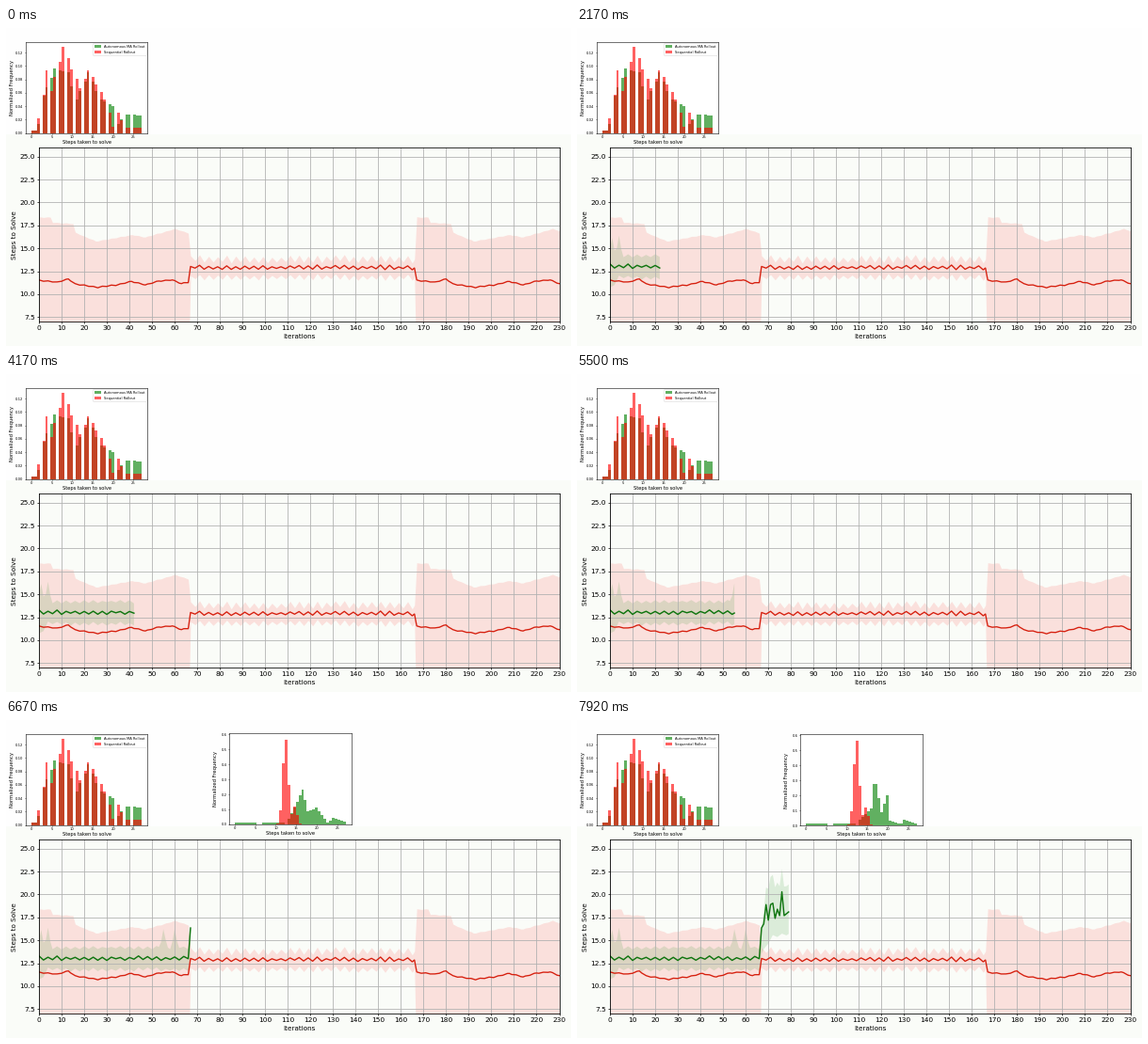
These frames come from a looping animation (600 px wide and 338 px high, 8000 ms). A matplotlib script:

```python
import math

import matplotlib.pyplot as plt
import numpy as np
from matplotlib.animation import FuncAnimation
from matplotlib.patches import Polygon, Rectangle
from matplotlib.transforms import Affine2D

W, H, DPI = 600, 338, 100
FRAMES, LOOP = 96, 8000
PT = 72 / DPI                      # points per pixel
RED, GREEN = "#d6200f", "#0f750f"
PAPER = "#fafcf8"
BINS = 40
BIN_W = 27 / BINS
JUMP, BACK, END = 67, 167, 230     # iterations where the behaviour switches

plt.rcParams["font.family"] = "DejaVu Sans"
rng = np.random.default_rng(4)

fig = plt.figure(figsize=(W / DPI, H / DPI), dpi=DPI, facecolor="#fefefe")
px = Affine2D().scale(1 / DPI) + fig.dpi_scale_trans
fig.add_artist(Rectangle((0, 0), W, H - 113, transform=px, fc=PAPER, lw=0, zorder=-5))


def px_axes(left, top, right, bottom, line, **kw):
    ax = fig.add_axes([left / W, 1 - bottom / H,
                       (right - left) / W, (bottom - top) / H], **kw)
    for spine in ax.spines.values():
        spine.set_linewidth(line * PT)
    return ax


def px_label(ax, x, y, text, size, rotation=0):
    ax.text(x, H - y, text, transform=px, fontsize=size * PT, rotation=rotation,
            ha="center", va="center", rotation_mode="anchor")


def curve(xs, *knots):
    return np.interp(xs, *np.array(knots).T)


def wobble(xs, amp, step=2):
    """Zigzag of random height around zero."""
    knots = np.arange(xs[0], xs[-1] + 2 * step, step)
    signs = np.where(np.arange(len(knots)) % 2, -1, 1)
    return np.interp(xs, knots, amp * signs * rng.uniform(0.2, 1, len(knots)))


def bell(xs, height, center, width):
    return height * np.exp(-0.5 * ((xs - center) / width) ** 2)


def integer_bins(*knots):
    """Heights for whole step counts, dropped into the finer bins."""
    steps = np.arange(28)
    heights = np.zeros(BINS)
    heights[np.minimum((steps / BIN_W).astype(int), BINS - 1)] = curve(steps, *knots)
    return heights


def histogram(box, ymax, yticks, fmt, green, red):
    left, top, right, bottom = box
    ax = px_axes(*box, line=0.55, facecolor="white")
    edges = np.arange(BINS) * BIN_W
    for heights, color, name in ((green, "green", "Autonomous MA Rollout"),
                                 (red, "red", "Sequential Rollout")):
        ax.bar(edges, heights, BIN_W, align="edge", color=color, alpha=0.62,
               linewidth=0, label=name)
    ax.set(xlim=(-1.35, 28.35), ylim=(0, ymax))
    ax.set_xticks(range(0, 26, 5))
    ax.set_yticks(yticks, [fmt % v for v in yticks])
    ax.tick_params(labelsize=3.7 * PT, length=1.2 * PT, width=0.5 * PT, pad=1.2 * PT)
    px_label(ax, (left + right) / 2, bottom + 9.6, "Steps taken to solve", 5.1)
    px_label(ax, left - 14.5, (top + bottom) / 2 + 0.5, "Normalized Frequency", 5.2, 90)
    return ax


# Histograms
hist = histogram(
    (21, 15, 150, 111.7), 0.1355, np.arange(0, .13, .02), "%.2f",
    integer_bins((1, .004), (2, .013), (3, .055), (6, .096), (9, .09), (11, .05),
                 (14, .09), (17, .05), (20, .04), (21, .013), (23, .028), (27, .026)),
    integer_bins((1, .004), (2, .022), (4, .093), (5, .062), (8, .129), (10, .095),
                 (12, .067), (14, .094), (18, .05), (20, .01), (21, .03), (23, .008)))
legend = hist.legend(loc="upper right", fontsize=3.6 * PT, borderpad=0.35,
                     labelspacing=0.5, borderaxespad=0.4)
legend.get_frame().set_linewidth(0.5 * PT)

bins = np.arange(BINS)
floor = np.where(bins % 10 < 8, .011, 0)
peak = bell(bins, .58, 17.8, .95) + bell(bins, .12, 21.2, .7)


def phase(top, *knots):
    green = np.where(bins < 19, floor, curve(bins, *knots))
    return histogram((237, top, 366.5, top + 97), .609, np.arange(0, .61, .1), "%.1f",
                     green, peak)


phases = {
    67: phase(14, (19, .04), (21, .11), (24, .235), (26, .09), (29, .11), (32, .04),
              (33, .01), (35, .045), (39, .02)),
    77: phase(15, (19, .04), (23, .11), (24, .275), (25, .275), (27, .09), (29, .2),
              (30, .03), (34, .01), (35, .04), (39, .011)),
}

# Main chart
main = px_axes(35, 127, 587.5, 312.2, line=0.8, facecolor=PAPER)
main.set(xlim=(0, END), ylim=(7, 26))
main.set_xticks(range(0, END + 1, 10))
main.set_yticks(np.arange(7.5, 25.1, 2.5))
main.grid(color="#b0b0b0", linewidth=0.8 * PT)
main.tick_params(labelsize=7.5 * PT, length=2.2 * PT, width=0.7 * PT, pad=2 * PT)
px_label(main, 311, 328, "Iterations", 7.25)
px_label(main, 9, 220, "Steps to Solve", 7.25, 90)

# Red: a calm stretch, a busy one, then the calm one again
calm = np.arange(JUMP)
calm_mean = wobble(calm, 0.06) + curve(
    calm, (0, 11.5), (8, 11.3), (13, 11.65), (16, 11.1), (26, 10.75), (34, 11.0),
    (41, 11.4), (47, 11.0), (53, 11.45), (59, 11.55), (63, 11.15), (66, 11.3))
calm_top = wobble(calm, 0.05) + curve(
    calm, (0, 18.4), (5, 18.4), (6, 17.85), (15, 17.7), (16, 16.75), (25, 15.8),
    (41, 16.5), (47, 16.25), (60, 17.15), (66, 16.7))
busy = np.arange(JUMP, BACK)
busy_mean = 12.92 + wobble(busy, 0.28)
busy_top = busy_mean + 0.95 + wobble(busy, 0.25)
busy_low = busy_mean - 1.05 + wobble(busy, 0.15)


def joined(first, second):
    return np.concatenate([first, second, first[:END + 1 - BACK]])


xs = np.arange(END + 1)
main.fill_between(xs, joined(0 * calm, busy_low), joined(calm_top, busy_top),
                  color="red", alpha=0.11, linewidth=0)
main.plot(xs, joined(calm_mean, busy_mean), color=RED, linewidth=1.35 * PT)

# Green: steady until the jump, then noisy and higher
gx = np.arange(81)
surge = np.array([16.35, 16.8, 18.9, 17.2, 18.9, 19.05, 17.4, 18.4, 17.7, 20.3,
                  17.7, 17.9, 18.1, 18.0])
green_mean = 13.05 + wobble(gx, 0.25)
green_mean[JUMP:] = surge
spikes = sum(bell(gx, 2, c, 0.7) for c in (1, 4, 55, 60))
green_top = wobble(gx, 0.2) + spikes + curve(
    gx, (0, 14.2), (66, 14.2), (67, 17.8), (70, 21.3), (80, 21))
green_low = wobble(gx, 0.25) + curve(
    gx, (0, 10.6), (4, 11.8), (66, 11.8), (67, 13.6), (72, 15.5), (80, 15.8))
green_top[JUMP:] += 0.7 * (surge - surge.mean())

band = main.add_patch(Polygon([(0, 0)], closed=True, fc="green", alpha=0.12, lw=0))
line, = main.plot([], [], color=GREEN, linewidth=1.45 * PT)


def update(i):
    n = math.ceil(10 * i / 12 - 0.5 - 1e-9)     # ten iterations per second
    shown = slice(0, n + 1 if n else 0)
    x = gx[shown]
    line.set_data(x, green_mean[shown])
    band.set_visible(n > 0)
    if n:
        band.set_xy(np.column_stack([
            np.r_[x, x[::-1]], np.r_[green_top[shown], green_low[shown][::-1]]]))
    current = max((start for start in phases if n >= start), default=None)
    for start, ax in phases.items():
        ax.set_visible(start == current)
    return line, band


anim = FuncAnimation(fig, update, frames=FRAMES, interval=LOOP / FRAMES,
                     repeat=True, repeat_delay=0, blit=False)
plt.show()
```
